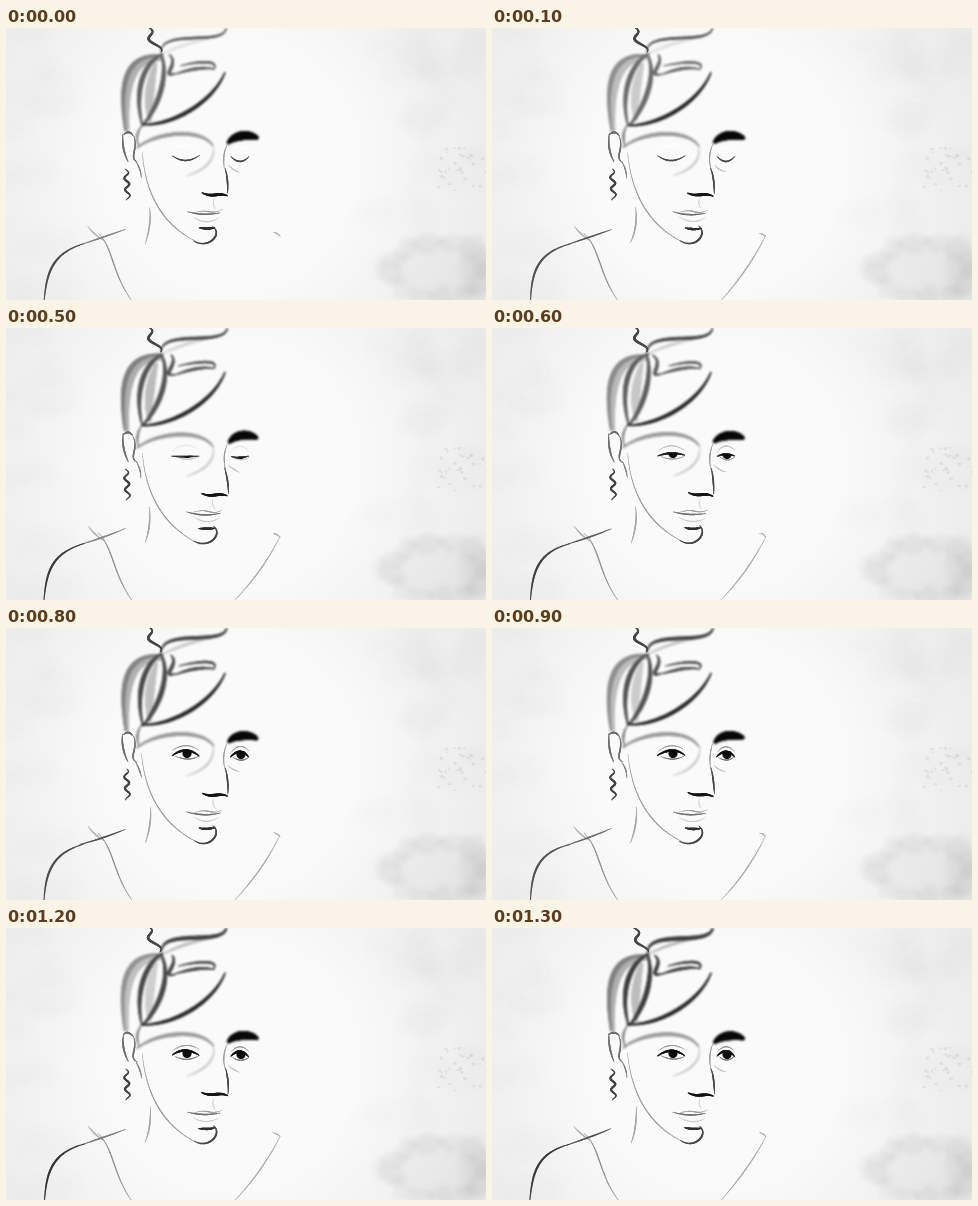
Recreate the animation shown at these times as an HTML page with a canvas. Size 480 by 272 pixels, loop 1400 ms.

```html
<!DOCTYPE html>
<html lang="en">
<head>
<meta charset="utf-8">
<title>Ink portrait</title>
<style>
html, body { margin: 0; width: 100%; height: 100%; overflow: hidden; background: #f9f9f9; }
canvas { position: absolute; left: 0; top: 0; }
#wash { filter: blur(1px); }
#ink { filter: blur(.35px); }
</style>
</head>
<body>
<canvas id="paper" width="480" height="272"></canvas>
<canvas id="wash" width="480" height="272"></canvas>
<canvas id="ink" width="480" height="272"></canvas>
<script>
const STEP = 100, STEPS = 14;
const [paper, wash, ink] = ['paper', 'wash', 'ink'].map(id => document.getElementById(id).getContext('2d'));

let seed;
function rand(lo = 0, hi = 1) {
  seed = (seed * 1664525 + 1013904223) >>> 0;
  return lo + (hi - lo) * seed / 4294967296;
}

function blob(x, y, rx, ry, alpha, blur) {
  paper.filter = `blur(${blur}px)`;
  paper.fillStyle = `rgba(70,70,70,${alpha})`;
  paper.beginPath();
  for (let a = 0; a < Math.PI * 2; a += .35) {
    const k = rand(.75, 1.25);
    paper.lineTo(x + Math.cos(a) * rx * k, y + Math.sin(a) * ry * k);
  }
  paper.fill();
}

function drawPaper() {
  seed = 12;
  paper.fillStyle = '#fafafa';
  paper.fillRect(0, 0, 480, 272);
  const edge = paper.createRadialGradient(225, 136, 120, 225, 136, 275);
  edge.addColorStop(0, 'rgba(60,60,60,0)');
  edge.addColorStop(1, 'rgba(60,60,60,.08)');
  paper.fillStyle = edge;
  paper.fillRect(0, 0, 480, 272);
  for (let i = 0; i < 30; i++) {
    const x = i % 3 ? rand(365, 480) : rand(0, 50);
    blob(x, rand(0, 272), rand(12, 34), rand(8, 24), .014, 5);
  }
  // Damp stain: a soft patch with a darker rim.
  blob(432, 244, 54, 30, .035, 3);
  for (let a = 0; a < Math.PI * 2; a += .5)
    blob(432 + 48 * Math.cos(a), 242 + 28 * Math.sin(a), rand(7, 15), rand(7, 13), .045, 2);
  blob(472, 238, 18, 34, .05, 3);
  for (let i = 0; i < 30; i++)
    blob(rand(432, 480), rand(120, 165), rand(.7, 2.2), rand(.6, 2), .09, .5);
  paper.filter = 'none';
}

// Lays a stroke along point(t), swelling in the middle and thinning at both ends.
function brush(c, gray, width, point) {
  c.strokeStyle = `rgb(${gray},${gray},${gray})`;
  c.lineCap = 'round';
  c.globalCompositeOperation = 'darken';
  const n = 40;
  for (let i = 0; i < n; i++) {
    c.lineWidth = width * (.4 + .6 * Math.sin(Math.PI * (i + .5) / n));
    c.beginPath();
    c.moveTo(...point(i / n));
    c.lineTo(...point((i + 1) / n));
    c.stroke();
  }
}

// Cubic curve through eight coordinates, with a slightly unsteady hand.
function curve(c, gray, width, ...coords) {
  const p = coords.map(v => v + rand(-.6, .6));
  brush(c, gray, width, t => {
    const u = 1 - t;
    return [0, 1].map(d => u * u * u * p[d] + 3 * u * u * t * p[d + 2] + 3 * u * t * t * p[d + 4] + t * t * t * p[d + 6]);
  });
}

// Simple bow; a positive bend sags to the right-hand side of its direction.
function arc(c, gray, width, x0, y0, x1, y1, bend = 0) {
  const dx = x1 - x0, dy = y1 - y0, k = bend * 4 / 3 / Math.hypot(dx, dy);
  const ox = -dy * k, oy = dx * k;
  curve(c, gray, width, x0, y0, x0 + dx / 3 + ox, y0 + dy / 3 + oy, x0 + dx * 2 / 3 + ox, y0 + dy * 2 / 3 + oy, x1, y1);
}

// Downward squiggle, used for loose curls.
function curl(gray, width, x0, y0, x1, y1, amp, turns) {
  const phase = rand(-.4, .4);
  brush(ink, gray, width, t => [
    x0 + (x1 - x0) * t + amp * Math.sin(turns * t * Math.PI * 2 + phase),
    y0 + (y1 - y0) * t
  ]);
}

function drawHair(step) {
  const late = step / STEPS, sway = 3 * Math.sin(step * 1.7);
  const soft = rand(120, 150), dark = rand(95, 115) - 40 * late;

  curve(wash, soft + 45, 11, 121, 102, 115, 52, 126, 28, 154, 30);
  curve(wash, soft, 5, 119, 102, 112, 50, 122, 26, 156, 27);
  arc(wash, soft + 60, 9, 144, 92, 150, 36, -3);
  curve(wash, dark, 5, 136, 96, 128, 62, 138 + sway, 34, 156, 26);
  curve(wash, dark, 5, 155, 26, 164 + sway, 50, 150, 84, 137, 97);
  curve(wash, 40, 4, 136, 97, 165, 98, 206, 76, 219, 45);

  // Ribbon: a hook, then a long flat loop.
  curve(wash, dark, 3.5, 163 + sway, 27, 174, 36, 153, 50, 170, 46);
  curve(wash, dark, 3, 170, 46, 182, 42, 196, 38, 208, 41);
  curve(wash, dark, 2.5, 208, 41, 214, 32, 193, 33, 175 - sway, 38);

  curl(70, 2.6, 140, -2, 153, 24, 4, 1.4);
  curve(wash, 80 - 20 * late, 2.5 + 2 * late, 155, 23, 158, 0, 222, 20, 221, -2);
  arc(wash, 225 - 40 * late, 3, 156, 26, 212, 9, -2);
  arc(wash, 125, 2, 136, 97, 133, 119, 3);
}

function drawEar() {
  arc(ink, 110, 1.8, 117, 107, 127, 108, -3);
  arc(ink, 110, 1.8, 117, 106, 122, 134, 2);
  curve(ink, 110, 1.6, 127, 108, 133, 120, 122, 130, 131, 134);
  arc(ink, 130, 1.2, 130, 134, 135, 150, -1);
  curl(65, 2.2, 120, 141, 122, 172, 2.3, 2.7);
}

function drawEye(x, y, w, open) {
  const bend = 5 - 10 * open, lid = y + 2 + bend;
  ink.save();
  ink.beginPath();
  ink.rect(x - w, lid, 2 * w, Math.max(0, y + 5 - lid));
  ink.clip();
  ink.fillStyle = '#0c0c0c';
  ink.beginPath();
  ink.arc(x, y + .5, 4.6, 0, 7);
  ink.fill();
  ink.restore();
  arc(ink, 70 - 50 * open, 1.5 + open, x - w, y + 2.5, x + w * .8, y + 2.5, bend);
  const faint = 250 - 130 * open;
  arc(ink, faint, 1.1, x - w * .8, y + 3, x + w * .8, y + 3, 3);
  arc(ink, faint + 30, 1, x - w, y - 2, x + w * .8, y - 3, -5);
}

function drawFace(step) {
  const wake = Math.max(0, Math.min(1, (step - 4) / 4));
  const open = Math.sin(wake * Math.PI / 2);
  curve(wash, 155, 4, 131, 120, 150, 104, 195, 100, 207, 118);
  curve(wash, 195, 1.8, 207, 118, 210, 134, 196, 143, 181, 148);
  curve(wash, 8, 9, 223, 114, 230, 106, 243, 106, 251, 110);
  drawEye(181, 125, 15, open);
  drawEye(235, 126, 10, open);
  arc(ink, 190, .9, 222, 137, 234, 144, 1);

  arc(ink, 150, 1.1, 221, 116, 219, 141, 2);
  arc(ink, 70, 1.6, 219, 140, 222, 166, -1);
  curve(ink, 20, 2.9, 196, 165, 206, 170, 212, 164, 221, 168);
  arc(ink, 210, .8, 208, 170, 210, 181, 2);

  arc(ink, 110, 1.5, 181, 184, 214, 185, 2);
  curve(ink, 150, 1, 187, 185, 203, 179, 203, 188, 216, 182);
  arc(ink, 200, 1, 187, 189, 213, 190, 4);

  curve(ink, 145, 1.1, 136, 125, 140, 175, 165, 203, 195, 216);
  curve(ink, 70, 1.9, 188, 213, 203, 222, 217, 205, 207, 198);
  arc(ink, 45, 2.4, 193, 200, 209, 200, 1);
}

function drawBody(step) {
  arc(ink, 165, 1.5, 144, 179, 139, 215, -2);
  arc(ink, rand(70, 140), 1.5, 119, 201, 74, 217, -.5);
  curve(ink, rand(40, 90), 2.1, 78, 216, 45, 225, 40, 245, 38, 274);
  arc(ink, 175, 1.2, 82, 198, 98, 213, 1);
  curve(ink, 140, 1.2, 92, 205, 108, 220, 106, 246, 127, 274);
  arc(ink, 180, 1, 267, 205, 274, 209, -1);
  if (step) arc(ink, 165, 1.2, 274, 208, 228, 273, -3);
}

function draw(step) {
  seed = 977 * (step + 3);
  for (const c of [wash, ink]) c.clearRect(0, 0, 480, 272);
  drawHair(step);
  drawEar();
  drawFace(step);
  drawBody(step);
}

drawPaper();
const start = performance.now();
let shown = -1;
function tick(now) {
  const step = Math.floor(Math.max(0, now - start) / STEP) % STEPS;
  if (step !== shown) draw(shown = step);
  requestAnimationFrame(tick);
}
tick(start);
</script>
</body>
</html>
```
